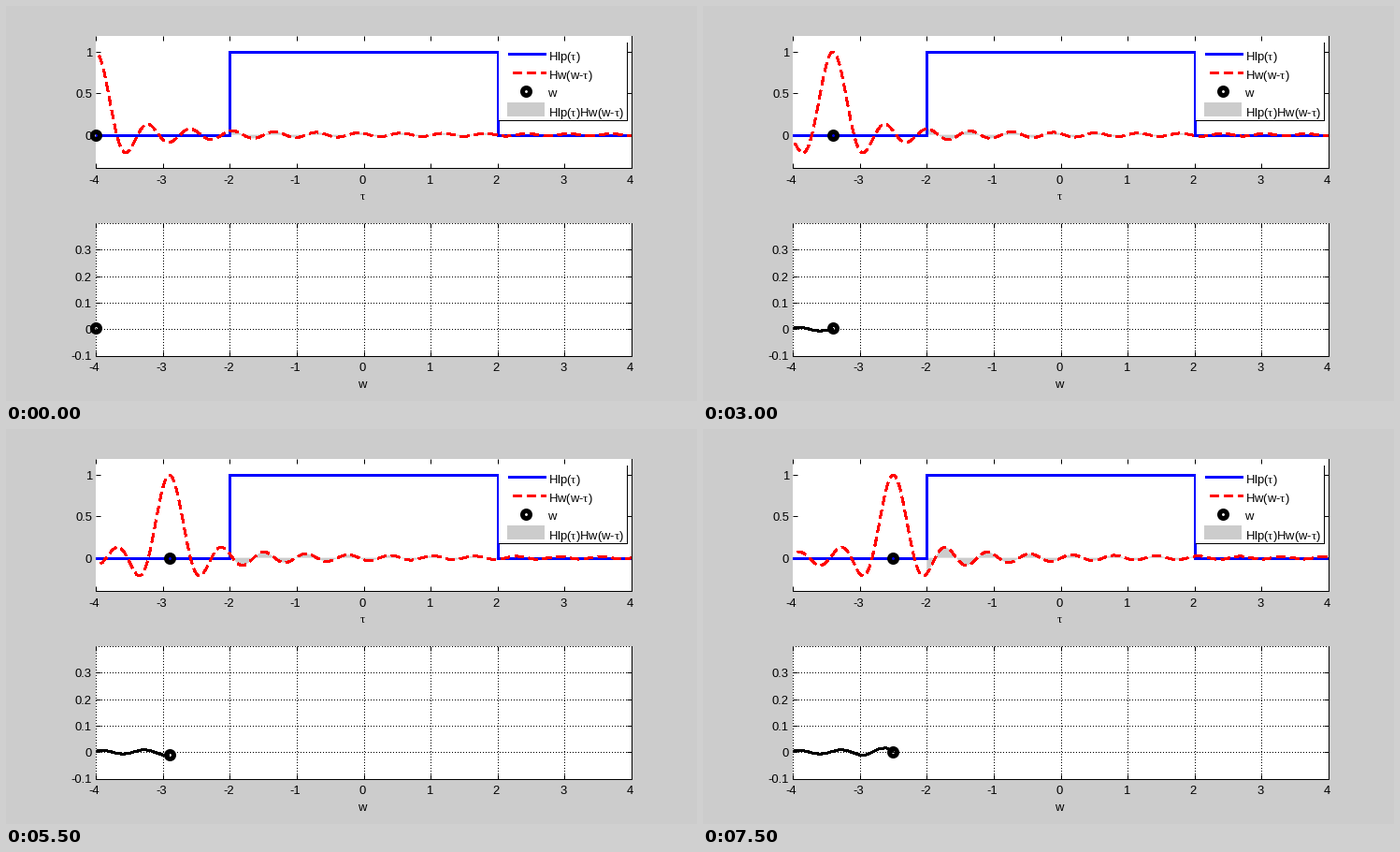
Recreate the animation shown at these times as a matplotlib script. Size 739 by 422 pixels, loop 8000 ms.

```python
import numpy as np
import matplotlib.pyplot as plt
from matplotlib.animation import FuncAnimation
from matplotlib.patches import Rectangle

W, H = 739, 422
FRAMES, STEP_MS = 16, 500
GRAY = "0.8"

plt.rcParams.update({
    "font.family": "Liberation Sans",
    "font.size": 13,
    "mathtext.fontset": "custom",
    "mathtext.rm": "Liberation Sans",
    "mathtext.it": "Liberation Serif",
    "lines.scale_dashes": False,
    "lines.antialiased": False,
    "lines.dash_capstyle": "butt",
    "lines.solid_capstyle": "butt",
})

# At 72 dpi one point is one pixel
fig = plt.figure(figsize=(W / 72, H / 72), dpi=72, facecolor=GRAY)

LEFT, RIGHT, HEIGHT = 96, 669, 141.5
# Aliased strokes cover every touched pixel, so 2 renders as about 3
RED = dict(color="red", lw=2, ls=(9.5, (9, 5)), snap=False)
BLUE = dict(color="blue", lw=3)
RING = dict(color="black", marker="o", ms=8, mew=5, fillstyle="none",
            ls="none", clip_on=False, zorder=6)


def label(x, y, text, ha="center"):
    fig.text(x / W, 1 - y / H, text, ha=ha, va="baseline", zorder=-1)


def panel(top, ylim, yticks, xlabel):
    bottom = top + HEIGHT
    ax = fig.add_axes([LEFT / W, 1 - bottom / H, (RIGHT - LEFT) / W, HEIGHT / H])
    ax.set(xlim=(-4, 4), ylim=ylim, xticks=range(-4, 5), yticks=yticks)
    ax.spines[["top", "left"]].set_visible(False)
    ax.spines[["right", "bottom"]].set_linewidth(1)
    ax.tick_params(direction="in", length=5, width=1, top=True, right=True,
                   labelbottom=False, labelleft=False)
    for t in range(-4, 5):
        label(LEFT + (t + 4) / 8 * (RIGHT - LEFT) - 1.5, bottom + 16.5, f"{t}")
    for t in yticks:
        y = bottom - (t - ylim[0]) / (ylim[1] - ylim[0]) * HEIGHT
        label(92, y + 5, f"{t:g}", ha="right")
    label(381, bottom + 34.5, xlabel)
    return ax


def window(x):
    return np.sinc(10 * x / np.pi)


def response(w):
    y = window(w - band)
    return np.sum(y[1:] + y[:-1]) / 2 * (band[1] - band[0])


tau = np.linspace(-4, 4, 801)
band = np.linspace(-2, 2, 401)
centers = -4 + 0.1 * np.arange(FRAMES)
output = np.array([response(w) for w in centers])

# Upper panel
top = panel(31.5, (-0.4, 1.2), [0, 0.5, 1], r"$\tau$")
area, = top.fill([-2, 2, 2], [0, 0, 0], color=GRAY, lw=0, zorder=1)
top.plot([-4, -2, -2, 2, 2, 4], [0, 0, 1, 1, 0, 0], zorder=3, **BLUE)
wave, = top.plot([], [], zorder=4, **RED)
top_dot, = top.plot([], [], **RING)

# Lower panel
low = panel(232, (-0.1, 0.4), [-0.1, 0, 0.1, 0.2, 0.3], "w")
# The half-pixel dash offset keeps every dot on a whole pixel
dots = dict(color="black", lw=1, ls=(0.5, (1, 2)), zorder=1,
            clip_on=False, antialiased=True)
for x in range(-4, 5):
    low.axvline(x, **dots)
for k in range(-1, 5):
    low.axhline(k / 10, **dots)
trace, = low.plot([], [], color="black", lw=2, zorder=4)
low_dot, = low.plot([], [], **RING)

# Legend
key = fig.add_axes([0, 0, 1, 1], zorder=5)
key.set(xlim=(0, W), ylim=(H, 0))
key.axis("off")
key.add_patch(Rectangle((527, 39), 138, 84, fc="white", lw=0))
key.plot([527, 664, 664], [122, 122, 39], color="black", lw=1)
key.plot([537, 577], [51, 51], **BLUE)
key.plot([537, 577.5], [71.5, 71.5], **RED)
key.plot([556], [91], **RING)
key.add_patch(Rectangle((536, 103), 40, 15, fc=GRAY, lw=0))
entries = [(58, r"Hlp($\tau$)"), (78, r"Hw(w-$\tau$)"), (97, "w"),
           (118, r"Hlp($\tau$)Hw(w-$\tau$)")]
for y, text in entries:
    key.text(579.5, y, text, va="baseline")


def update(i):
    w = centers[i]
    wave.set_data(tau, window(w - tau))
    edge = np.column_stack([band, window(w - band)])
    area.set_xy(np.vstack([[-2, 0], edge, [2, 0]]))
    top_dot.set_data([w], [0])
    trace.set_data(centers[:i + 1], output[:i + 1])
    low_dot.set_data([w], [output[i]])
    return area, wave, top_dot, trace, low_dot


anim = FuncAnimation(fig, update, frames=FRAMES, interval=STEP_MS,
                     repeat=True, repeat_delay=0, blit=False)
plt.show()
```
